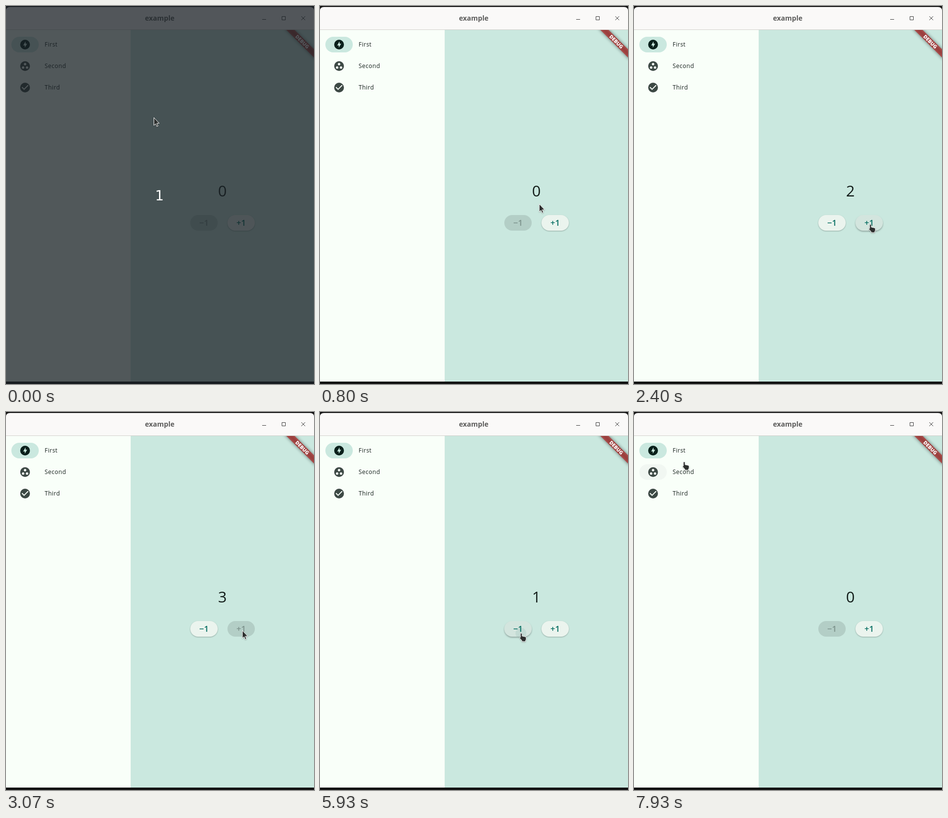
An HTML page for the animation above (8000 ms loop, 630 by 774 pixels).

```html
<!DOCTYPE html>
<html lang="en">
<head>
<meta charset="utf-8">
<title>example</title>
<style>
html, body { margin: 0; width: 100%; height: 100%; overflow: hidden; background: #131313; }
svg { display: block; font-family: "Open Sans", "Noto Sans", sans-serif; }
.mid { text-anchor: middle; }
.label { font-size: 12px; font-weight: 500; letter-spacing: .5px; fill: #16201d; }
.btn { font-size: 17px; font-weight: 600; }
.controls { fill: none; stroke: #3d3d3d; }
.pointer { fill: #2d2f2e; stroke: #fff; stroke-linejoin: round; filter: drop-shadow(0 1px 1px rgba(0,0,0,.3)); }
</style>
</head>
<body>
<svg width="630" height="774" viewBox="0 0 630 774">
  <defs>
    <filter id="blur" x="-50%" y="-200%" width="200%" height="500%"><feGaussianBlur stdDeviation="3.5"/></filter>
    <clipPath id="body"><rect y="49" width="630" height="720"/></clipPath>
    <clipPath id="minusShape"><rect x="377" y="428" width="56" height="32" rx="16"/></clipPath>
    <clipPath id="plusShape"><rect x="453" y="428" width="56" height="32" rx="16"/></clipPath>
  </defs>

  <path d="M0 49V10Q0 2 8 2H622Q630 2 630 10V49Z" fill="#faf9f8"/>
  <path d="M0 48.5H630" stroke="#d3d0cc"/>
  <text class="mid" x="314.5" y="30" font-size="14.2" font-weight="700" fill="#5c5c5b">example</text>
  <path class="controls" d="M524 27.5h8M564.5 21.5h7v7h-7zM604 21l8 8m0-8l-8 8"/>

  <rect y="49" width="255" height="720" fill="#f9fff9"/>
  <rect x="255" y="49" width="375" height="720" fill="#cae8df"/>

  <rect x="11" y="63" width="56" height="32" rx="16" fill="#cae8df"/>
  <rect id="itemHover" x="11" y="107" width="56" height="32" rx="16" fill="#f1f7f2"/>
  <g transform="translate(27 67)">
    <circle cx="12" cy="12" r="10" fill="#08201b"/>
    <path d="M11.5 18.2V13.7H8.2L13 5.5V10.3H16.2Z" fill="#cae8df"/>
  </g>
  <g transform="translate(27 111)">
    <circle cx="12" cy="12" r="10" fill="#3d4945"/>
    <g fill="#f9fff9"><circle cx="12" cy="8" r="2.5"/><circle cx="8" cy="15" r="2.5"/><circle cx="16" cy="15" r="2.5"/></g>
  </g>
  <g transform="translate(27 155)">
    <circle cx="12" cy="12" r="10" fill="#3d4945"/>
    <path d="M5.7 11.3L10 15.6L18.3 7.3" fill="none" stroke="#f9fff9" stroke-width="2"/>
  </g>
  <text class="label" x="79" y="83">First</text>
  <text class="label" x="79" y="127">Second</text>
  <text class="label" x="79" y="171">Third</text>

  <g clip-path="url(#body)">
    <g transform="translate(630 49) rotate(45)">
      <rect x="-45" y="28" width="90" height="12" opacity=".5" filter="url(#blur)"/>
      <rect x="-45" y="28" width="90" height="12" fill="#b71c1c" fill-opacity=".63"/>
      <text class="mid" y="37.7" font-size="10.2" font-weight="800" fill="#fff">DEBUG</text>
    </g>
  </g>

  <text id="count" class="mid" x="442.5" y="390" font-size="31" fill="#121c19"></text>

  <rect id="minus" x="377" y="428" width="56" height="32" rx="16"/>
  <rect id="plus" x="453" y="428" width="56" height="32" rx="16"/>
  <g clip-path="url(#minusShape)"><circle id="minusInk" cx="411" cy="453" fill="#006b5f"/></g>
  <g clip-path="url(#plusShape)"><circle id="plusInk" cx="484" cy="447" fill="#006b5f"/></g>
  <text id="minusText" class="btn mid" x="405" y="450">−1</text>
  <text id="plusText" class="btn mid" x="481" y="450">+1</text>

  <g id="intro">
    <rect width="630" height="774" fill="#1a2026" fill-opacity=".75"/>
    <text class="mid" x="314" y="398" font-size="28" fill="#fff" style="font-family:'DejaVu Sans',sans-serif">1</text>
  </g>

  <g id="cursor">
    <path id="arrow" class="pointer" d="M.5 .5V16.5L4 13.2L6.4 18.8L9 17.7L6.6 12.2H11.5Z"/>
    <path id="hand" class="pointer" d="M-1 1.3Q-1 0 .7 0T2.4 1.3V5.8L9 7.2Q10.7 7.7 10.7 9.5V12.5L9.5 15V17H2V15.2L-2 10.5Q-3 9-1.8 8.3L-1 8.5Z"/>
  </g>
</svg>
<script>
const LOOP = 8000;
const $ = id => document.getElementById(id);
const smooth = p => p * p * (3 - 2 * p);

// Eased values between keys of the form [time, value, ...].
function track(t, keys) {
  const i = keys.findIndex(k => k[0] > t);
  if (i === 0) return keys[0].slice(1);
  if (i < 0) return keys.at(-1).slice(1);
  const a = keys[i - 1], b = keys[i];
  const p = smooth((t - a[0]) / (b[0] - a[0]));
  return a.slice(1).map((v, j) => v + (b[j + 1] - v) * p);
}

const within = (t, spans) => spans.some(([from, to]) => t >= from && t < to);

const path = [
  [470, 302, 228], [930, 483, 447], [3870, 483, 447], [3950, 436, 457], [4130, 411, 453],
  [6130, 411, 453], [6400, 399, 538], [7670, 399, 538], [7930, 102, 102]
];
const handSpans = [[870, 2800], [3960, 6070], [7900, LOOP]];
const counts = [[0, 0], [1270, 1], [2000, 2], [2730, 3], [4400, 2], [4930, 1], [6000, 0]];

// Button levels: 0 flat, 1 raised, 2 hovered.
const buttons = [
  { id: 'minus', off: [[0, 1270], [6000, LOOP]], presses: [4930, 5930],
    level: [[1270, 0], [1470, 1], [3930, 1], [4130, 2], [6000, 2], [6200, 0]] },
  { id: 'plus', off: [[2730, 4400]], presses: [2000],
    level: [[870, 1], [1070, 2], [2730, 2], [2930, 0], [4400, 0], [4530, 1]] }
];
const fills = [[249, 255, 249], [235, 244, 238], [211, 229, 222]];

function levelFill(level) {
  const i = Math.min(1, Math.floor(level));
  return `rgb(${fills[i].map((c, j) => c + (fills[i + 1][j] - c) * (level - i))})`;
}

function drawButton({ id, off, presses, level }, t) {
  const disabled = within(t, off);
  const [l] = track(t, level);
  $(id).style.fill = disabled ? '#b3cec6' : levelFill(l);
  $(id).style.filter = `drop-shadow(0 ${l}px ${l * .9}px rgba(0,0,0,${Math.min(1, l) * .28}))`;
  $(id + 'Text').style.fill = disabled ? '#7b918b' : '#006b5f';
  const press = presses.find(p => t >= p && t < p + 135);
  const age = press === undefined ? 1 : (t - press) / 135;
  $(id + 'Ink').setAttribute('r', 11 + 14 * age);
  $(id + 'Ink').style.opacity = disabled ? 0 : .08 * (1 - age);
}

function show(id, on) {
  $(id).style.display = on ? '' : 'none';
}

function draw(now) {
  const t = now % LOOP;
  show('intro', t < 70);
  $('count').textContent = counts.findLast(k => k[0] <= t)[1];
  buttons.forEach(b => drawButton(b, t));
  $('itemHover').style.opacity = track(t, [[7860, 0], [7930, 1]])[0];
  $('cursor').setAttribute('transform', `translate(${track(t, path).map(Math.round)})`);
  const hand = within(t, handSpans);
  show('hand', hand);
  show('arrow', !hand);
}

const start = performance.now();
function frame() {
  draw(performance.now() - start);
  requestAnimationFrame(frame);
}
frame();
</script>
</body>
</html>
```
